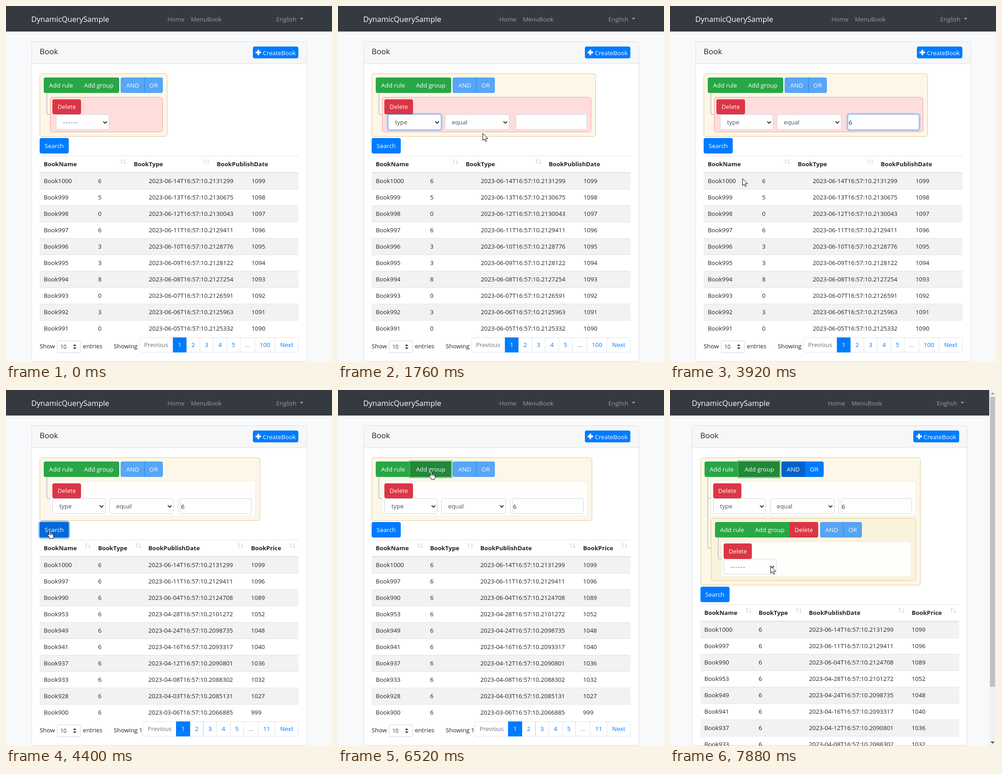
Animation, 717 px wide and 782 px high, one loop 8 s. Source, as an HTML page:

```html
<!DOCTYPE html>
<html lang="en">
<head>
<meta charset="utf-8">
<title>Dynamic query</title>
<style>
html, body { margin: 0; width: 100%; height: 100%; overflow: hidden; }
#stage {
  position: relative; width: 717px; height: 782px; overflow: hidden; background: #f8f9fb;
  font: 13.3px/20px "Open Sans", "Noto Sans", sans-serif; color: #212529;
}
#stage div, #stage svg { position: absolute; box-sizing: border-box; }
#page, #low, .on { left: 0; top: 0; }
.text { white-space: pre; }
.grown #page { left: -7.5px; }
.grown #low { top: 142px; }
.grown .card { height: 846px; }

.nav { background: #343a40; box-shadow: 0 2px 4px rgba(0,0,0,.075); }
.brand { font-size: 16.5px; color: #fff; }
.link { color: rgba(255,255,255,.5); }
.light { color: #fff; }
.caret { border: 4.2px solid transparent; border-top-color: rgba(255,255,255,.5); border-bottom: 0; }
.card { background: #fff; border: 1px solid #dfdfdf; border-radius: 4px; }
.cardhead { background: #f7f7f7; border-bottom: 1px solid #dfdfdf; border-radius: 3px 3px 0 0; }
.title { font-size: 17px; font-weight: 500; }

.btn { display: flex; align-items: center; justify-content: center; color: #fff; border-radius: 4px; white-space: pre; }
.l { border-radius: 4px 0 0 4px; }
.m { border-radius: 0; }
.r { border-radius: 0 4px 4px 0; }
.green { background: #28a745; }
.greenHot { background: #218838; }
.greenRing { border: 1px solid #1e7e34; box-shadow: 0 0 0 3px rgba(72,180,97,.5); }
.red { background: #dc3545; }
.redHot { background: #c82333; }
.blue { background: #007bff; }
.blueHot { background: #0069d9; }
.blueOn { background: #0062cc; }
.ring { box-shadow: 0 0 0 3px rgba(38,143,255,.5); }
.off { opacity: .65; }
.white { background: #fff; }

.group { background: rgba(250,240,210,.5); border: 1px solid #dcc896; border-radius: 5px; }
.rule { background: rgba(255,255,255,.9); border: 1px solid #eee; border-radius: 5px; }
.bad { background: #fdd; border-color: #f99; }
.joint { border: solid #ccc; border-width: 0 0 2px 2px; }
.end { border-bottom-left-radius: 4px; }
.field {
  display: flex; align-items: center; padding-left: 14px; white-space: pre;
  background: #fff; border: 1px solid #ced4da; border-radius: 4px; color: #495057;
}
.focus { border-color: #80bdff; box-shadow: 0 0 0 3px rgba(0,123,255,.25); }
.dash { letter-spacing: 1.3px; }
.sep { background: #ddd; }
.popup { background: #fff; border: 1px solid #999; box-shadow: 0 1px 5px rgba(0,0,0,.25); }
.item { padding-left: 14px; color: #495057; white-space: pre; }
.hot { background: #1967d2; color: #fff; }
.hint { background: #fff; border: 1px solid #d0d0d0; border-radius: 3px; box-shadow: 0 1px 3px rgba(0,0,0,.25); }
.small { font-size: 11.7px; color: #333; }
.ink { background: #000; }
.spin { background: #efefef; }

.line { background: #dee2e6; }
.row { border-top: 1px solid #dee2e6; }
.odd { background: #f2f2f2; }
.th { font-weight: 700; font-size: 13.2px; }
.pg { display: flex; align-items: center; justify-content: center; background: #fff; border: 1px solid #dee2e6; color: #007bff; }
.pg.now { z-index: 1; background: #007bff; border-color: #007bff; color: #fff; }
.pg.dim { color: #6c757d; }
.track { background: #f1f1f1; }
.thumb { background: #c1c1c1; }
</style>
</head>
<body>
<div id="stage">
  <div id="page"></div>
  <div id="over"></div>
  <div id="cursor"></div>
</div>
<script>
const $ = id => document.getElementById(id);
const LOOP = 8000;
// Moments when the layout changes
const PICK = 1240, VALID = 4160, LOADED = 4400, GROW = 6740;

const box = (x, y, w, h, cls, inner = '') =>
  `<div class="${cls}" style="left:${x}px;top:${y}px;width:${w}px;height:${h}px">${inner}</div>`;
const text = (x, mid, str, cls = '') =>
  `<div class="text ${cls}" style="left:${x}px;top:${mid - 10}px">${str}</div>`;
const svg = (x, y, w, h, inner) =>
  `<svg style="left:${x}px;top:${y}px" width="${w}" height="${h}">${inner}</svg>`;
// Shown only inside the given time windows, such as "80-200,400-680".
const on = (when, html) => `<div class="on" data-on="${when}">${html}</div>`;
const btn = (x, y, w, cls, str) => box(x, y, w, 33.5, 'btn ' + cls, str);

const DASH = '<span class="dash">------</span>';
const select = (x, y, w, str, cls = '') => box(x, y, w, 33.5, 'field ' + cls, str +
  svg(w - 15, 12.5, 10, 8, '<path d="M1 1.5l4 4 4-4" fill="none" stroke="#333" stroke-width="2"/>'));
const triangles = (x, y, gap) => svg(x, y, 8, 8 + gap,
  `<path d="M0 4l4-4 4 4zM0 ${4 + gap}h8l-4 4z" fill="#343a40"/>`);

// Query builder
const addRule = (x, y, cls) => btn(x, y, 75.5, 'l ' + cls, 'Add rule');
const addGroup = (x, y, cls) => btn(x + 75.5, y, 90, cls, 'Add group');
const andOr = (x, y, cls) =>
  btn(x, y, 52.6, 'l blue ' + cls, 'AND') + btn(x + 51.6, y, 41.2, 'r blue ' + cls, 'OR');
const head = (x, y, cls) => addRule(x, y, 'green') + addGroup(x, y, 'r green') + andOr(x + 169, y, cls);
const joint = (x, y, h, cls = '') => box(x, y, 8, h, 'joint ' + cls);
const rule = (x, y, w, cls = '') =>
  box(x, y, w, 77, 'rule ' + cls) + btn(x + 5, y + 4.7, 62.6, 'red', 'Delete');
const valueRule = (bad, w) => {
  const x = 102.4 + (bad ? 8 : 0);
  return rule(97.4, 200, w, bad ? 'bad' : '') + select(x, 238.4, 116.5, 'type') +
    select(x + 124.8, 238.4, 142, 'equal') + box(x + 276, 239, 1, 33, 'sep') +
    box(x + 280.6, 238.4, 156.5, 33.5, 'field');
};

const SX = 83.4, SY = 157;
const firstJoint = joint(89.4, 191, 48, 'end');

const emptyScene = box(74, 148, 281, 138.5, 'group') + firstJoint + head(SX, SY, 'off') +
  rule(97.4, 200, 248, 'bad') + select(110.4, 238.4, 116.5, DASH);

const names = [DASH, 'name', 'type', 'publishDate', 'price'];
const item = (i, cls = '') => box(111.4, 272.5 + 20 * i, 115, 20, 'item ' + cls, names[i]);
const popup = on(`520-${PICK}`, select(110.4, 238.4, 116.5, DASH, 'focus')) +
  on(`560-${PICK}`, box(110.4, 271.5, 117, 102, 'popup') + names.map((_, i) => item(i)).join('')) +
  on('560-960', item(0, 'hot')) + on('960-1020', item(1, 'hot')) + on(`1020-${PICK}`, item(2, 'hot'));

const wideScene = box(74, 148, 492.6, 138.5, 'group') + firstJoint + head(SX, SY, 'off') + valueRule(true, 459.4) +
  on(`${PICK}-2320`, select(110.4, 238.4, 116.5, 'type', 'focus')) +
  on('2320-4080', box(391, 238.4, 156.5, 33.5, 'field focus')) +
  on('2000-3560', box(534, 247, 11, 17, 'spin') + triangles(535.5, 249, 5)) +
  on('2400-3240', box(390.6, 272, 169.5, 47, 'hint') + text(402, 294, '1', 'small')) +
  on('2320-2800', box(393, 246, 1, 19, 'ink')) +
  on(`3240-${VALID}`, text(393, 256, '6')) +
  on('3240-3740', box(401, 246, 1, 19, 'ink'));

const validRule = valueRule(false, 451.4) + text(385, 256, '6');
const validScene = box(74, 148, 484.6, 138.5, 'group') + firstJoint + head(SX, SY, 'off') + validRule +
  on('5840-5930', btn(102.4, 204.7, 62.6, 'redHot', 'Delete')) +
  on('6030-6160', addRule(SX, SY, 'greenHot')) +
  on('6160-6360', addGroup(SX, SY, 'r greenHot')) +
  on(`6360-${GROW}`, addGroup(SX, SY, 'greenHot m greenRing'));

const NX = SX + 23, NY = SY + 133;
const nestedScene = box(74, 148, 484.6, 280.5, 'group') +
  joint(89.4, 191, 48) + joint(89.4, 237, 112, 'end') +
  head(SX, SY, '') + addGroup(SX, SY, 'greenHot m greenRing') +
  on(`6840-${LOOP}`, btn(252.4, SY, 52.6, 'l blueOn', 'AND')) +
  validRule +
  box(97.4, 281, 451.4, 138, 'group') + joint(112.4, 324, 48, 'end') +
  addRule(NX, NY, 'green') + addGroup(NX, NY, 'm green') +
  on('7400-7560', addGroup(NX, NY, 'm greenHot')) +
  btn(NX + 164, NY, 63, 'r red', 'Delete') + andOr(NX + 230.6, NY, 'off') +
  rule(120.4, 332.7, 418.6) + select(125.4, 371.3, 116.5, DASH);

// Table
const sortMark = x => svg(x - 7, 336, 14, 12,
  '<path d="M3.5 11V1M1 3.5L3.5 1 6 3.5M10.5 1v10M8 8.5l2.5 2.5L13 8.5" fill="none" stroke="#c9cacb"/>');
const header = cols => cols.map(([x, str, mark]) =>
  text(x, 347, str, 'th') + (mark ? sortMark(mark) : '')).join('');
const rows = (list, shift) => list.map(([n, type, date, frac], i) => {
  const y = 366 + 36 * i, mid = y + 18;
  return box(74, y, 569.4, 36, 'row' + (i % 2 ? '' : ' odd')) + text(82.9, mid, 'Book' + n) +
    text(202.4, mid, type) + text(313 + shift, mid, `2023-${date}T16:57:10.${frac}`) +
    text(539 + shift, mid, +n + 99);
}).join('');

const types = '6506338030';
const allRows = '2131299 2130675 2130043 2129411 2128776 2128122 2127254 2126591 2125963 2125332'
  .split(' ').map((frac, i) => [1000 - i, types[i], '06-' + String(14 - i).padStart(2, '0'), frac]);
const sixRows = `1000 06-14 2131299,997 06-11 2129411,990 06-04 2124708,953 04-28 2101272,
949 04-24 2098735,941 04-16 2093317,937 04-12 2090801,933 04-08 2088302,928 04-03 2085131,900 03-06 2066885`
  .split(',').map(s => s.trim().split(' ')).map(([n, date, frac]) => [n, '6', date, frac]);

const pager = (x, last, lastW) => {
  const cells = [['Previous', 74, 'dim'], ['1', 29.55, 'now'], ['2', 29.55], ['3', 29.55], ['4', 29.55],
    ['5', 29.55], ['...', 32.3, 'dim'], [last, lastW], ['Next', 51]];
  return cells.map(([str, w, cls = ''], i) => {
    const edge = i === 0 ? ' l' : i === 8 ? ' r' : '';
    const html = box(x, 727.5, w + 1, 33.5, `pg ${cls}${edge}`, str);
    x += w;
    return html;
  }).join('');
};

const low = btn(74, 290, 64, 'blue', 'Search') +
  on('4020-4080', btn(74, 290, 64, 'blueHot', 'Search')) +
  on('4080-6360', btn(74, 290, 64, 'blueHot ring', 'Search')) +
  box(74, 329, 569.4, 1, 'line') + box(74, 364.5, 569.4, 2, 'line') +
  text(74, 747, 'Show') + box(112, 735, 53, 26.5, 'field') + text(119.5, 748, '10', 'small') +
  triangles(146.5, 743, 3) + text(169, 747, 'entries') + text(237, 747, 'Showing 1') +
  on(`0-${LOADED}`, header([[82.9, 'BookName', 258], [280.9, 'BookType', 441], [463.4, 'BookPublishDate']]) +
    rows(allRows, 1) + pager(292.8, '100', 44.6)) +
  on(`${LOADED}-${LOOP}`, header([[82.9, 'BookName', 180], [202.4, 'BookType', 290.5],
    [313, 'BookPublishDate', 516], [539, 'BookPrice', 630]]) +
    rows(sixRows, 0) + pager(300.4, '11', 37));

$('page').innerHTML =
  box(-20, 0, 760, 56, 'nav') + text(55.5, 29, 'DynamicQuerySample', 'brand') +
  text(354.9, 28.5, 'Home', 'link') + text(406.5, 28.5, 'MenuBook', 'link') +
  text(594.5, 28.5, 'English', 'link') + box(646, 26, 8.4, 4.2, 'caret') +
  box(55.5, 77.5, 606, 703.5, 'card') + box(56.5, 78.5, 604, 48, 'cardhead') +
  text(74, 100, 'Book', 'title') +
  box(542.9, 89, 100.4, 26, 'btn blue') + text(565, 102.5, 'CreateBook', 'light') +
  box(549.4, 100, 12, 4, 'white') + box(553.4, 96, 4, 12, 'white') +
  `<div id="low">${low}</div>` +
  on(`0-${PICK}`, emptyScene + popup) + on(`${PICK}-${VALID}`, wideScene) +
  on(`${VALID}-${GROW}`, validScene) + on(`${GROW}-${LOOP}`, nestedScene);

$('over').innerHTML = on(`${GROW}-${LOOP}`, box(702, 0, 15, 782, 'track') + box(704, 15, 11, 637, 'thumb') +
  svg(705, 5, 9, 5, '<path d="M0 5l4.5-5L9 5z" fill="#a3a3a3"/>') +
  svg(705, 772, 9, 5, '<path d="M0 0h9L4.5 5z" fill="#505050"/>'));

// Pointer shapes, placed around the hot spot
const arrow = svg(0, 0, 13, 20,
  '<path d="M.5 1v15.5l3.6-3.4 2.5 5.4 2.3-1-2.4-5.3h5.2z" fill="#fff" stroke="#000"/>');
const hand = svg(-6, 0, 17, 21,
  '<path d="M4.5 11.5V2.1a1.4 1.4 0 0 1 2.8 0V8c.3-.9 2.6-.8 2.7.4.5-.8 2.5-.6 2.6.6.6-.6 2.1-.3 2.1 1v4.5' +
  'c0 1.5-1.4 2.6-1.6 5H6.6c0-2-2-3.4-3.6-5.6-1.2-1.6-2-2.6-1.2-3.3.8-.7 2 0 2.7.9z" fill="#fff" stroke="#000"/>' +
  '<path d="M7.3 8v4M10 8.5V12M12.6 9.2V12" stroke="#000"/>');
const beamPath = 'M1 1.5h3l1 1 1-1h3M5 2v14M1 16.5h3l1-1 1 1h3';
const beam = svg(-5, -8, 10, 18, `<path d="${beamPath}" fill="none" stroke="#fff" stroke-width="3"/>` +
  `<path d="${beamPath}" fill="none" stroke="#000" stroke-width="1.4"/>`);
$('cursor').innerHTML = on('80-1960,3560-4020,4720-5840,7080-7400,7560-8000', arrow) +
  on('1960-3560', beam) + on('4020-4720,5840-7080,7400-7560', hand);

const path = [
  [80, 450, 442], [200, 182, 226], [380, 182, 226], [520, 205, 248], [900, 205, 248], [1080, 175, 313],
  [1240, 175, 313], [1400, 200, 308], [1760, 318, 279], [2000, 413, 258], [2140, 422, 256],
  [3460, 422, 256], [3600, 385, 340], [3760, 290, 438], [3900, 170, 390], [4040, 96, 307],
  [4620, 96, 307], [4960, 190, 385], [5120, 203, 407], [5400, 190, 318], [5460, 190, 318],
  [5720, 157, 250], [5880, 158, 222], [5960, 170, 190], [6080, 148, 177], [6260, 205, 177],
  [6800, 205, 177], [7120, 251, 203], [7180, 251, 203],
  [7480, 232, 305], [7860, 221, 386], [8000, 221, 386]
];
const pointAt = t => {
  const i = Math.max(1, path.findIndex(p => p[0] > t));
  const [t0, x0, y0] = path[i - 1], [t1, x1, y1] = path[i];
  const k = Math.max(0, (t - t0) / (t1 - t0));
  return [x0 + (x1 - x0) * k, y0 + (y1 - y0) * k].map(Math.round);
};

const timed = [...document.querySelectorAll('[data-on]')].map(el =>
  ({ el, spans: el.dataset.on.split(',').map(s => s.split('-').map(Number)) }));
const start = performance.now();

function draw() {
  const t = (performance.now() - start) % LOOP;
  for (const { el, spans } of timed)
    el.style.display = spans.some(([a, b]) => t >= a && t < b) ? '' : 'none';
  $('stage').classList.toggle('grown', t >= GROW);
  const [x, y] = pointAt(t);
  $('cursor').style.transform = `translate(${x}px,${y}px)`;
  requestAnimationFrame(draw);
}
draw();
</script>
</body>
</html>
```
